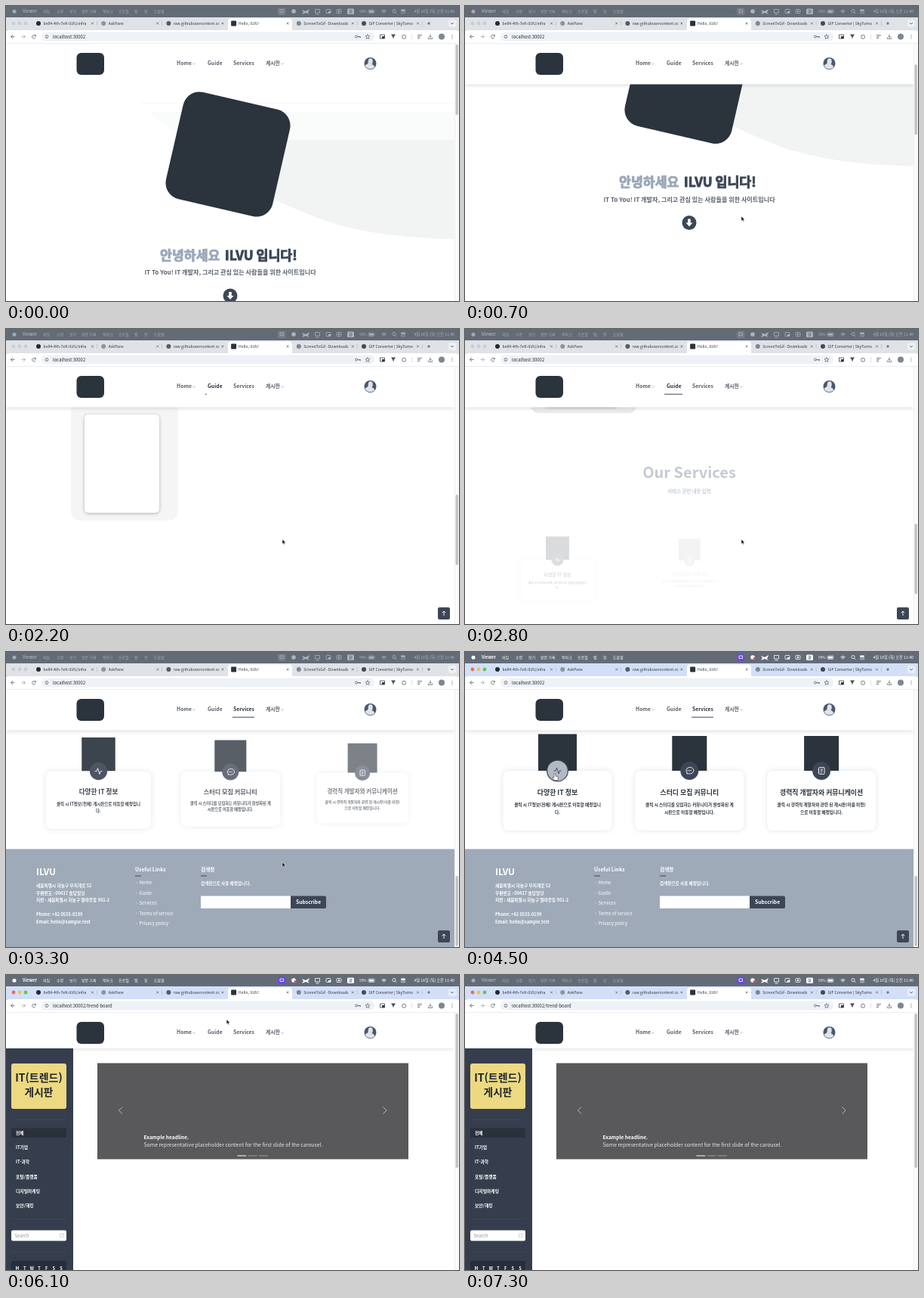
Animation, 600 px wide and 390 px high, one loop 7400 ms. Source, as an HTML page with a canvas:

```html
<!DOCTYPE html>
<html lang="ko">
<head>
<meta charset="utf-8">
<title>Screen recording</title>
<style>
html, body { margin: 0; width: 100%; height: 100%; overflow: hidden; background: #fff; }
canvas { display: block; width: 600px; height: 390px; }
</style>
</head>
<body>
<canvas id="stage" width="600" height="390"></canvas>
<script>
const ctx = document.getElementById('stage').getContext('2d');
const LOOP = 7400, FOCUS = 4200, LOAD = 4900, BLUR = 7250;
const FONT = '"Noto Sans CJK KR", "Noto Sans CJK", "Noto Sans", sans-serif';
const DARK = '#3d4656', INK = '#2b333d', MUTED = '#9ba7b9';

// Timing helpers
const clamp = v => Math.max(0, Math.min(1, v));
const ease = v => { v = clamp(v); return v * v * (3 - 2 * v); };
const progress = (t, start, duration = 1000) => ease((t - start) / duration);
function track(t, keys) {
  const i = keys.findIndex(k => k[0] > t);
  if (i === 0) return keys[0].slice(1);
  if (i < 0) return keys[keys.length - 1].slice(1);
  const a = keys[i - 1], b = keys[i], p = progress(t, a[0], b[0] - a[0]);
  return a.slice(1).map((v, j) => v + (b[j + 1] - v) * p);
}

// Drawing helpers
function text(str, x, y, size, color = DARK, weight = 700, align = 'left') {
  ctx.font = `${weight} ${size}px ${FONT}`;
  ctx.fillStyle = color;
  ctx.textAlign = align;
  ctx.textBaseline = 'middle';
  ctx.fillText(str, x, y);
}
const centered = (str, x, y, size, color, weight) => text(str, x, y, size, color, weight, 'center');
function heavyText(str, x, y, size, color) {
  text(str, x, y, size, color, 900);
  ctx.strokeStyle = color;
  ctx.lineWidth = 0.9;
  ctx.strokeText(str, x, y);
}
function box(x, y, w, h, color, radius = 0) {
  ctx.fillStyle = color;
  ctx.beginPath();
  ctx.roundRect(x, y, w, h, radius);
  ctx.fill();
}
function frame(x, y, w, h, color, radius = 0, width = 0.8) {
  ctx.strokeStyle = color;
  ctx.lineWidth = width;
  ctx.beginPath();
  ctx.roundRect(x, y, w, h, radius);
  ctx.stroke();
}
function disc(x, y, r, color) {
  ctx.fillStyle = color;
  ctx.beginPath();
  ctx.arc(x, y, r, 0, 7);
  ctx.fill();
}
function ring(x, y, r, color, width = 0.8) {
  ctx.strokeStyle = color;
  ctx.lineWidth = width;
  ctx.beginPath();
  ctx.arc(x, y, r, 0, 7);
  ctx.stroke();
}
function stroke(d, x, y, color, width = 0.8) {
  ctx.save();
  ctx.translate(x, y);
  ctx.strokeStyle = color;
  ctx.lineWidth = width;
  ctx.stroke(new Path2D(d));
  ctx.restore();
}
function fillPath(d, x, y, color) {
  ctx.save();
  ctx.translate(x, y);
  ctx.fillStyle = color;
  ctx.fill(new Path2D(d));
  ctx.restore();
}
// Draws scaled about the middle of its area, then veils it with white to fade it as one group.
function reveal(p, scale, [x, y, w, h], draw) {
  if (p <= 0) return;
  const cx = x + w / 2, cy = y + h / 2;
  ctx.save();
  ctx.translate(cx, cy);
  ctx.scale(scale, scale);
  ctx.translate(-cx, -cy);
  draw();
  if (p < 1) box(x, y, w, h, `rgba(255,255,255,${1 - p})`);
  ctx.restore();
}
function faded(alpha, draw) {
  ctx.save();
  ctx.globalAlpha = alpha;
  draw();
  ctx.restore();
}
function shadowed(color, blur, dy, draw) {
  ctx.save();
  ctx.shadowColor = color;
  ctx.shadowBlur = blur;
  ctx.shadowOffsetY = dy;
  draw();
  ctx.restore();
}

// Browser window
const MENUS = [['파일', 49], ['수정', 67], ['보기', 84], ['방문 기록', 100], ['북마크', 128],
  ['프로필', 149], ['탭', 170], ['창', 183], ['도움말', 196]];
const TABS = [['be04-4th-7eK-ILVU/infra', '#24292f'], ['AskPane', '#8d949e'],
  ['raw.githubusercontent.com', '#555c66'], ['Hello, ILVU!', INK],
  ['ScreenToGif - Downloads', '#7d8794'], ['GIF Converter | SkyTurno', '#444b55']];

function menuBar(t) {
  const focused = t >= FOCUS;
  const left = focused && t < BLUR ? '#fff' : '#a5abb3', right = focused ? '#fff' : '#adb3bb';
  box(0, 0, 600, 15, '#636b77');
  disc(11, 7.3, 2.5, left);
  text('Viewer', 22, 7.3, 5.6, left);
  for (const [label, x] of MENUS) text(label, x, 7.3, 5, left, 500);
  box(360, 2.5, 10.5, 9.5, focused ? '#6a4bd8' : '#767d88', 2);
  frame(363, 5, 4.5, 3.5, right);
  disc(381, 7, 2.8, right);
  if (focused) disc(383, 8.5, 1.6, '#e2574c');
  fillPath('M-5-2L0 0 5-3 3 2 5 4 0 2-5 4-3 1Z', 397, 7, right);
  frame(409.5, 4.5, 6, 4.5, right);
  stroke('M-2 0H2', 412.5, 11, right);
  frame(424, 4.5, 6, 5, right, 1);
  box(427, 7, 3, 2.5, right);
  frame(438, 4.5, 6, 5, right, 1);
  fillPath('M-1-1.5 2 0-1 1.5Z', 441, 7, right);
  box(452, 3.5, 9, 7.5, right, 1.5);
  centered('한', 456.5, 7.3, 5, '#636b77');
  text('99%', 468, 7.3, 4.8, right, 500);
  frame(480, 5, 8, 4.5, right, 1, 0.6);
  box(481, 6, 6, 2.5, right);
  for (const r of [1.2, 2.8, 4.4]) {
    ctx.strokeStyle = right;
    ctx.lineWidth = 0.9;
    ctx.beginPath();
    ctx.arc(500.5, 10, r, -2.3, -0.84);
    ctx.stroke();
  }
  ring(514, 6.6, 2.1, right);
  stroke('M0 0 2 2', 515.5, 8.2, right);
  box(523, 4.5, 6, 2.2, right, 1);
  frame(523.3, 7.8, 5.5, 2, right, 1, 0.6);
  text('4월 18일 (목) 오전 11:40', 594, 7.3, 5.2, right, 500, 'right');
}

function tabStrip(t) {
  const focused = t >= FOCUS;
  const lights = focused ? ['#ed6a5e', '#f4bf4f', '#61c554'] : ['#c9ced5', '#c9ced5', '#c9ced5'];
  box(0, 15, 600, 18, focused ? '#d3dff7' : '#dfe2e6');
  lights.forEach((color, i) => disc(10 + 8 * i, 23, 2.4, color));
  box(294, 16.5, 85, 20, '#fff', 4);
  TABS.forEach(([label, color], i) => {
    const x = 43 + i * 86.2;
    if (i === 3) box(x - 3.5, 19.5, 7, 7, color, 1);
    else disc(x, 23, 3, color);
    ctx.save();
    ctx.beginPath();
    ctx.rect(x + 5, 16, 62, 15);
    ctx.clip();
    text(label, x + 6.5, 23, 5.1, '#30353d', 500);
    ctx.restore();
    stroke('M-1.4-1.4 1.4 1.4M1.4-1.4-1.4 1.4', x + 71.5, 23, '#555b65', 0.7);
    if (i !== 2 && i !== 3) box(x + 77, 20, 0.6, 6, '#aeb4bf');
  });
  stroke('M-2 0H2M0-2V2', 560, 23, '#444a54');
  box(586, 18, 10.5, 10, focused ? '#e6edfb' : '#eef0f2', 3);
  stroke('M-2-1 0 1 2-1', 591, 23, '#444a54');
}

function toolbar(url) {
  const gray = '#5a616c';
  box(0, 32, 600, 17.5, '#fff', [5, 5, 0, 0]);
  stroke('M2.5 0H-2.5M0-2.5-2.5 0 0 2.5', 9, 40.5, gray);
  stroke('M-2.5 0H2.5M0-2.5 2.5 0 0 2.5', 23, 40.5, '#a0a6b0');
  stroke('M2 -1A2.3 2.3 0 1 0 2 1.2M2.4-2.5V-.6H.5', 37, 40.5, gray);
  box(47, 34.5, 441, 12, '#eef1f6', 6);
  disc(54, 40.5, 4, '#fff');
  ring(54, 40.5, 2.2, gray);
  stroke('M0-1V1.2', 54, 40.5, gray);
  text(url, 62, 40.3, 5.9, '#272c33', 500);
  ring(464, 40.5, 1.5, gray);
  stroke('M0 0H4V1.5M2.5 0V1.5', 465.5, 40.5, gray);
  stroke('M0-3 .8-.9 3-.8 1.3.6 1.9 2.8 0 1.6-1.9 2.8-1.3.6-3-.8-.8-.9Z', 479, 40.5, gray, 0.7);
  frame(495.5, 38, 6, 5, '#353b44');
  box(498, 40, 3.5, 3, '#353b44');
  fillPath('M-3-3H3L1 0 0 3-1 0Z', 513, 40.5, '#454b55');
  frame(524.8, 38.5, 4.5, 4.5, gray, 1);
  box(537, 37, 0.6, 7, '#c7cdd8');
  stroke('M-3-2H3M-3 0H1M-3 2H0', 548, 40.5, gray);
  stroke('M0-3V1M-1.6-.6 0 1 1.6-.6M-2.7 1V2.8H2.7V1', 562, 40.5, gray);
  disc(577, 40.5, 4, '#7b8796');
  for (const dy of [-2, 0, 2]) disc(591, 40.5 + dy, 0.6, gray);
  box(0, 49, 600, 0.6, '#d9dce1');
}

function scrollbar(scroll, range, thumb) {
  box(594, 49, 6, 341, '#fafafa');
  box(594, 49, 0.5, 341, '#e8e8e8');
  box(595.5, 51 + scroll / range * (338 - thumb), 3.4, thumb, '#c1c1c1', 1.7);
}

// Site header
function siteHeader(bottom, lifted, active, grow) {
  const paint = () => box(0, 48, 594, bottom - 48, '#fff');
  if (lifted) shadowed('rgba(60,70,90,.18)', 5, 1, paint); else paint();
  box(93.5, 62, 36.5, 29, INK, 6);
  [['Home', 226], ['Guide', 267], ['Services', 301], ['게시판', 344]].forEach(([label, x]) =>
    text(label, x, 75.7, 6.8, label === active ? INK : '#565e6b'));
  for (const x of [249, 366]) stroke('M-1.8-.8 0 1 1.8-.8', x, 76.3, '#8b93a0', 0.6);
  if (active === 'Guide') box(264, 85.7, 24 * grow, 1, DARK);
  if (active === 'Services') box(300, 85.7, 29 * grow, 1, DARK);
  disc(482.5, 76, 8, '#4b586e');
  ctx.save();
  ctx.beginPath();
  ctx.arc(482.5, 76, 7.3, 0, 7);
  ctx.clip();
  fillPath('M-3-2a3 3.8 0 0 1 6 0q0 3-1.5 4q4 1 5 7H-9.5q1-6 5-7Q-3 1-3-2Z', 482.8, 75, '#dfe3ea');
  ctx.restore();
}

// Home page
function hero() {
  fillPath('M190 140H594V308Q470 306 400 275 310 240 190 140Z', 0, 0, '#fafbfb');
  fillPath('M228 177H594V308Q470 306 400 275 310 240 228 177Z', 0, 0, '#f2f4f4');
  box(178, 128, 416, 0.6, '#f0f1f1');
  ctx.save();
  ctx.translate(294, 196);
  ctx.rotate(13 * Math.PI / 180);
  box(-72.5, -72.5, 145, 145, INK, 22);
  ctx.restore();
  heavyText('안녕하세요', 204, 329, 17.3, MUTED);
  heavyText('ILVU 입니다!', 290, 329, 17.3, DARK);
  centered('IT To You! IT 개발자, 그리고 관심 있는 사람들을 위한 사이트입니다', 297, 352, 8.1, '#59616d');
  disc(297, 383, 9.5, DARK);
  fillPath('M-1.8-5H1.8V0H4.5L0 5-4.5 0H-1.8Z', 297, 383, '#fff');
}

const FEATURE_ICONS = [
  () => {
    fillPath('M0-6H15V4H9L6 8V4H0Z', 51, 484, DARK);
    for (const x of [55, 58.5, 62]) disc(x, 483, 1, '#fff');
  },
  () => {
    for (const [x, r] of [[186, 3], [193, 2.3]]) disc(x, 480.5, r, DARK);
    fillPath('M0 10Q0 4 4.5 4T9 10ZM10 10Q10 6 8 4 15 2 15 10Z', 181, 479.5, DARK);
  },
  () => { ring(320, 482, 7, DARK, 1.3); centered('?', 320, 481.5, 10, DARK); },
  () => {
    box(444, 480, 15, 4, DARK);
    box(445, 485, 6, 6.5, DARK);
    box(452, 485, 6, 6.5, DARK);
    ring(448.8, 477.5, 2, DARK, 1.3);
    ring(454.2, 477.5, 2, DARK, 1.3);
  }
];
const FEATURES = [
  ['공지사항', '클릭 시 공지사항 페이지로 이동할 예정입', '니다.'],
  ['7eK', '클릭 시 서비스 제작자(7eK)에 관한 페이지', '로 이동할 예정입니다.'],
  ['FAQ', '클릭 시 FAQ(문의, 신고 게시판)으로 이동', '할 예정입니다.'],
  ['EVENT', '클릭 시 이벤트 관련 페이지로 이동할 예정', '입니다.']
];
function features(t) {
  FEATURES.forEach(([title, line1, line2], i) => {
    const p = progress(t, 760 + 160 * i), x = 51 + 131 * i;
    reveal(p, 1.2 - 0.2 * p, [x - 5, 470, 111, 70], () => {
      FEATURE_ICONS[i]();
      text(title, x, 505, 9.6, MUTED);
      text(line1, x, 523, 5.4, INK);
      text(line2, x, 532.5, 5.4, INK);
    });
  });
}

function guide(t) {
  reveal(progress(t, 1180), 1, [150, 610, 294, 65], () => {
    centered('Guide', 297, 630, 19.6, MUTED);
    centered('ILVU는 Integration of Technology To You 뜻의 약자로', 297, 655, 6.4, MUTED);
    centered('IT관련 정보를 사용자에게 전달하고 관심을 가지고 있는 사람들을 위한 서비스를 제공하고자 합니다.',
      297, 665, 6.3, MUTED);
  });
  reveal(progress(t, 1700), 1, [80, 710, 154, 168], () => {
    box(86, 715, 142, 157, '#ebebeb', 12);
    shadowed('rgba(0,0,0,.6)', 4, 1, () => box(104, 732, 99, 130, '#fff', 5));
  });
}

const CARDS = [
  ['다양한 IT 정보', '클릭 시 IT정보(전체) 게시판으로 이동할 예정입니', '다.'],
  ['스터디 모집 커뮤니티', '클릭 시 스터디를 모집하는 커뮤니티가 활성화된 게', '시판으로 이동할 예정입니다.'],
  ['경력직 개발자와 커뮤니케이션', '클릭 시 경력직 개발자와 관련 된 게시판(이름 미정)', '으로 이동할 예정입니다.']
];
function cardIcon(i, x, y, color) {
  if (i === 0) stroke('M-5 0H-2.5L-1-4 1.5 4 3 0H5', x, y, color, 0.9);
  if (i === 1) {
    stroke('M-3.5 4-3.2 2.5A5 4.3 0 1 1-1 3.8Z', x, y, color, 0.9);
    for (const dx of [-2, 0, 2]) disc(x + dx, y - 0.3, 0.7, color);
  }
  if (i === 2) {
    frame(x - 3.6, y - 4.4, 7.6, 8.8, color, 1, 0.9);
    stroke('M-1.5-2H2M-1.5 0H2M-1.5 2H1M-4.5-2H-3M-4.5 2H-3', x, y, color);
  }
}
function services(t) {
  reveal(progress(t, 2230), 1, [200, 930, 194, 55], () => {
    centered('Our Services', 297, 950, 20, MUTED);
    centered('서비스 관련 내용 입력', 297, 975, 6.4, '#9caccb');
  });
  CARDS.forEach(([title, line1, line2], i) => {
    const p = progress(t, 2560 + 110 * i, 900), x = 122.5 + 174.8 * i;
    const hover = i === 0 ? progress(t, 4050, 300) : 0, side = 46 + 5 * hover;
    reveal(p, 0.6 + 0.4 * p, [x - 82, 1006, 164, 144], () => {
      box(x - side / 2, 1037 - side / 2, side, side, INK);
      shadowed('rgba(70,80,95,.16)', 7, 0, () => box(x - 72, 1060, 144, 79, '#fff', 8));
      disc(x, 1060, 12 + 2.5 * hover, DARK);
      faded(hover, () => disc(x, 1060, 13.3, '#b2b9c5'));
      cardIcon(i, x, 1060, hover > 0.5 ? DARK : '#fff');
      centered(title, x, 1088.5, 8.9, INK);
      centered(line1, x, 1105, 5.65, INK);
      centered(line2, x, 1114.5, 5.65, INK);
    });
  });
}

function footer() {
  const top = 1163, white = '#fff';
  box(0, top + 0.6, 594, 132, '#9eaab8');
  text('ILVU', 40, top + 30, 12, white);
  [['새봄특별시 하늘구 무지개로 52', 49.2], ['우편번호 : 00417 솔담빌딩', 58.7],
    ['지번 : 새봄특별시 하늘구 별마루동 901-2', 68.2], ['Phone: +82 0555-0199', 87.2],
    ['Email: hello@sample.test', 96.7]].forEach(([line, y]) => text(line, 40, top + y, 5.7, white));
  text('Useful Links', 171, top + 27.5, 6.8, white);
  box(171, top + 35.5, 8, 1, DARK);
  ['Home', 'Guide', 'Services', 'Terms of service', 'Privacy policy'].forEach((link, i) => {
    const y = top + 44.8 + 13.5 * i;
    stroke('M-.8-1.5.8 0-.8 1.5', 173, y + 0.3, '#d6dde7', 0.6);
    text(link, 176.5, y, 6, white, 500);
  });
  text('검색창', 258, top + 27.5, 6.7, white);
  box(258, top + 35.5, 8, 1, DARK);
  text('검색창으로 사용 예정입니다.', 258, top + 46.2, 5.6, white);
  box(258, top + 62.5, 119, 16.5, white);
  box(377, top + 62.5, 47, 16.5, DARK, [0, 2, 2, 0]);
  centered('Subscribe', 400.5, top + 70.5, 6.8, white);
}

function homePage(t) {
  const [scroll] = track(t, [[450, 0], [1150, 329], [1700, 329], [2400, 690], [2550, 690], [3200, 903]]);
  ctx.save();
  ctx.translate(0, -scroll);
  hero();
  features(t);
  guide(t);
  services(t);
  footer();
  ctx.restore();
  const active = t >= 3000 ? 'Services' : t >= 2150 ? 'Guide' : '';
  siteHeader(103.5, scroll > 20, active, progress(t, t >= 3000 ? 3000 : 2150, 300));
  faded(progress(t, 850, 400), () => {
    box(572, 368, 16, 16, DARK, 2);
    stroke('M0 3V-3M-2.3-.7 0-3 2.3-.7', 580, 376, '#fff', 0.9);
  });
  scrollbar(scroll, 903, 93);
}

// Board page
function calendar() {
  const left = 15, step = 9.65, top = 388;
  box(7, 378, 73, 96, '#272e3a', 2);
  [...'MTWTFSS'].forEach((day, i) => centered(day, left + step * i, top, 5.6, '#fff'));
  for (let day = 1; day <= 28; day++) {
    const cell = day + 3, x = left + step * (cell % 7), y = top + 13 * (1 + Math.floor(cell / 7));
    const today = day === 14;
    if (today) box(x - 4.3, y - 4.5, 8.6, 9, '#ecd982', 1.5);
    const bold = today || [6, 10, 23, 25].includes(day);
    centered(day, x, y, 5.4, bold ? '#fff' : '#bcc2cc', bold ? 700 : 400);
  }
}
function sidebar() {
  box(0, 50, 89, 600, '#363e4d');
  box(7, 117, 73, 60, '#ecd982', 3);
  centered('IT(트렌드)', 43.5, 136, 14, '#1f242c');
  centered('게시판', 43.5, 155, 13.7, '#1f242c');
  for (const y of [191, 322, 366]) box(7, y, 73, 0.6, '#434c5c');
  box(7, 202.5, 73, 12.5, '#2a313d', 1);
  ['전체', 'IT기업', 'IT·과학', '포털/플랫폼', '디지털마케팅', '보안/해킹'].forEach((label, i) =>
    text(label, 13, 208.7 + 19.25 * i, 5.8, '#fff'));
  box(7, 337.5, 73, 14, '#fff', 2);
  text('Search', 11.5, 344.3, 6, '#8d949f', 400);
  frame(71.5, 342, 4.5, 4.8, '#b6bcc5', 0.5, 0.6);
  stroke('M0 0 3-3', 73.5, 344.5, '#b6bcc5', 0.6);
  calendar();
}
function carousel() {
  box(121, 116.5, 412, 127, '#59595b');
  stroke('M2-4.5-2.5 0 2 4.5', 152, 179, '#c4c4c5', 0.9);
  stroke('M-2-4.5 2.5 0-2 4.5', 501.5, 179, '#c4c4c5', 0.9);
  text('Example headline.', 182.5, 214.3, 6.6, '#fff');
  text('Some representative placeholder content for the first slide of the carousel.',
    182.5, 224, 6.9, '#e6e6e6', 500);
  [306.5, 320.7, 335].forEach((x, i) => box(x, 238.5, 11.8, 1, i ? '#9c9c9d' : '#fff'));
}
function boardPage(t) {
  const [scroll] = track(t, [[4950, 0], [5200, 70], [5350, 70], [5600, 0]]);
  ctx.save();
  ctx.translate(0, -scroll);
  sidebar();
  carousel();
  ctx.restore();
  siteHeader(97 + 6 * clamp(scroll / 20), true, '', 0);
  scrollbar(scroll, 227, 204);
}

function pointer(t) {
  if (t < 100 || t > 6300) return;
  const [x, y] = track(t, [[100, 400, 20], [450, 366, 278], [3400, 366, 278],
    [4150, 119, 161], [5800, 119, 161], [6300, 385, 4]]);
  const hand = t >= 4080 && t < LOAD;
  const shape = hand
    ? 'M-1 0Q0-1 1 0V3L4 4Q5 4 4.5 6L3.5 8.5H-1L-3 5Q-3 3.5-1 5Z'
    : 'M0 0V6.2L1.5 4.9 2.4 7 3.5 6.5 2.6 4.5H4.6Z';
  fillPath(shape, x, y, hand ? '#fff' : '#111');
  stroke(shape, x, y, hand ? '#222' : '#fff', 0.5);
}

function draw(now) {
  const t = now % LOOP, board = t >= LOAD;
  box(0, 0, 600, 390, '#fff');
  if (board) boardPage(t); else homePage(t);
  // The browser bars cover everything scrolled above the page area.
  box(0, 0, 600, 49, '#fff');
  menuBar(t);
  tabStrip(t);
  toolbar('localhost:30002' + (board ? '/trend-board' : ''));
  pointer(t);
}

const begin = performance.now();
(function tick() {
  draw(performance.now() - begin);
  requestAnimationFrame(tick);
})();
</script>
</body>
</html>
```
